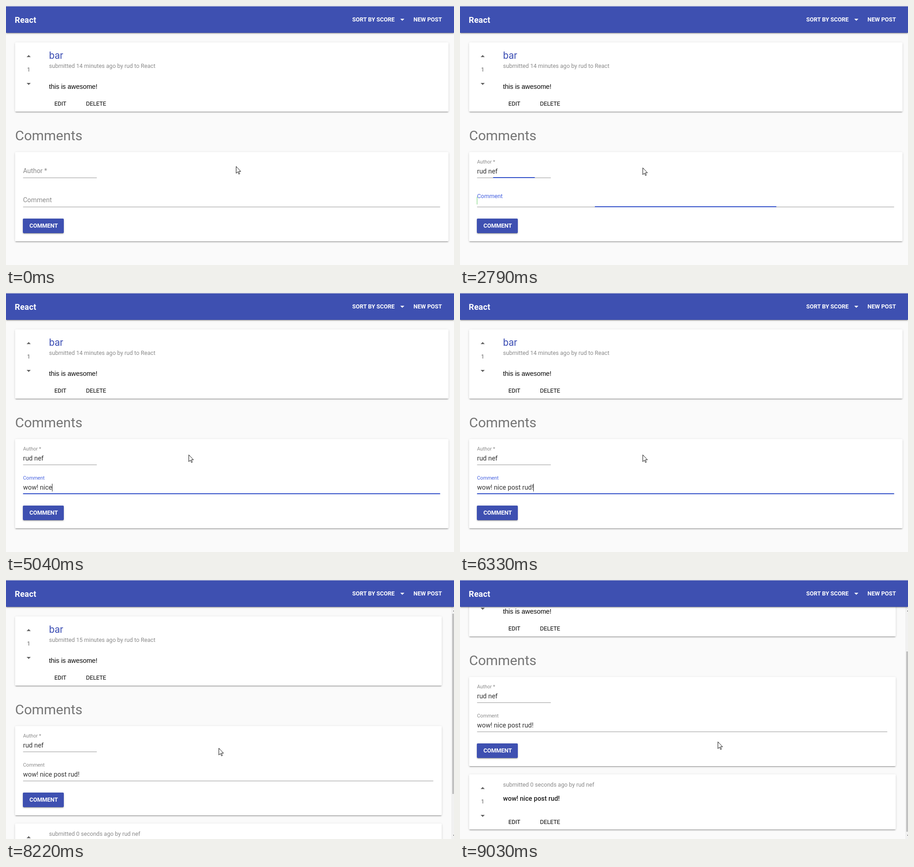
Recreate the animation shown at these times as an HTML page. Size 984x569 px, loop 10000 ms.

```html
<!DOCTYPE html>
<html lang="en">
<head>
<meta charset="utf-8">
<title>Comments</title>
<style>
  html, body { margin: 0; width: 100%; height: 100%; overflow: hidden; background: #fafafa; }
  body, svg { font-family: Roboto, sans-serif; }
  #stage { position: relative; width: 984px; height: 569px; overflow: hidden; }
  #stage div, svg { position: absolute; }
  svg { left: 0; top: 0; width: 984px; height: 569px; overflow: visible; white-space: pre; }
  .card { left: 20px; background: #fff; border-radius: 2px; }
  .card, #button, #header { box-shadow: 0 2px 2px rgba(0,0,0,.14), 0 3px 1px -2px rgba(0,0,0,.2), 0 1px 5px rgba(0,0,0,.12); }
  #button { left: 37px; top: 467px; width: 90px; height: 32px; border-radius: 2px; background: #3e50b1; }
  #header { left: 0; top: 0; width: 984px; height: 58px; border-top: 1px solid #d4d5dd; background: #3e50b1; }
  #bar { left: 978px; top: 59px; width: 15px; height: 510px; background: #f1f1f1; }
  #thumb { left: 2px; width: 12px; height: 396px; background: #c1c1c1; }
</style>
</head>
<body>
<div id="stage">
  <div id="page"><svg id="ink"></svg></div>
  <div id="bar"><div id="thumb"></div>
    <svg><path d="M4 10l3.5-4 3.5 4zM4 501l3.5 4 3.5-4z" fill="#505050"/></svg>
  </div>
  <div id="header"></div>
  <svg id="top"></svg>
</div>
<script>
const $ = id => document.getElementById(id);
const page = $('page'), ink = $('ink'), overlay = $('top');
const BLUE = '#304ec8', GREY = '#8a8a8a', LINE = '#979797';

function set(el, attrs) {
  for (const k in attrs) el.setAttribute(k, attrs[k]);
  return el;
}
function add(parent, tag, attrs) {
  const el = document.createElementNS('http://www.w3.org/2000/svg', tag);
  return parent.appendChild(set(el, attrs));
}
function text(parent, x, y, size, str, fill, more) {
  const el = add(parent, 'text', { x, y, 'font-size': size, fill, ...more });
  el.textContent = str;
  return el;
}
function box(top, height) {
  const el = document.createElement('div');
  el.className = 'card';
  el.style.cssText = `top:${top}px;height:${height}px`;
  page.insertBefore(el, ink);
  return el;
}
const medium = { 'font-weight': 500 };
const bold = { 'font-weight': 700 };

// Vote arrows, score and action buttons shared by post and reply
function votes(parent, y, actionsY) {
  add(parent, 'path', { d: `M45.3 ${y + 2.3}l4.5-4.5 4.5 4.5zM45.3 ${y + 59}l4.5 4.5 4.5-4.5z`, fill: '#616161' });
  text(parent, 49.8, y + 34.3, 12.6, '1', '#616161', { 'text-anchor': 'middle' });
  text(parent, 106.3, actionsY, 12.6, 'EDIT', '#000');
  text(parent, 175.8, actionsY, 12.6, 'DELETE', '#000');
}

const cards = [box(80, 152), box(321, 196), box(535, 121)];
const button = document.createElement('div');
button.id = 'button';
page.insertBefore(button, ink);

votes(ink, 110, 219.3);
text(ink, 94.5, 116, 21.6, 'bar', '#3f51b5');
const meta = text(ink, 94.5, 135.5, 12.6, '', GREY);
text(ink, 94.5, 182, 14.4, 'this is awesome!', '#000', { 'font-family': 'Liberation Sans, sans-serif' });
text(ink, 20, 295.3, 30.2, 'Comments', '#757575');
text(ink, 51.5, 487, 12.6, 'COMMENT', '#fff', bold);

const reply = add(ink, 'g', {});
votes(reply, 565, 644);
text(reply, 94.5, 562, 12.6, 'submitted 0 seconds ago by rud nef', GREY);
text(reply, 94.5, 593, 14.4, 'wow! nice post rud!', '#1c1c1c', medium);

function field(name, y) {
  const label = text(ink, 37.5, y, 14.4, name, GREY);
  const value = text(ink, 37.5, y + 1, 14.4, '', '#333');
  const line = add(ink, 'rect', { x: 37.5, y: y + 10, height: 1, fill: LINE });
  const focus = add(ink, 'rect', { y: y + 9, height: 2, fill: BLUE });
  return { y, label, value, line, focus };
}
const author = field('Author *', 367), comment = field('Comment', 431);
const caret = add(ink, 'rect', { width: 1, height: 17 });

text(overlay, 19.3, 37.3, 18, 'React', '#fff', { ...bold, 'letter-spacing': '.01em' });
text(overlay, 760.5, 34, 12.6, 'SORT BY SCORE', '#fff', bold);
text(overlay, 895, 34, 12.6, 'NEW POST', '#fff', bold);
add(overlay, 'path', { d: 'M866 28h9l-4.5 4.5z', fill: '#fff' });
const pointer = add(overlay, 'path', {
  d: 'M.5 .5v15l3.5-3.3 2.3 5.3 2.1-.9-2.3-5.2h4.6z', fill: '#fff', stroke: '#111'
});

const clamp = x => Math.max(0, Math.min(1, x));
const mix = (a, b, p) => a + (b - a) * p;
const smooth = x => x * x * (3 - 2 * x);

// cubic-bezier(.4, 0, .2, 1) over 200 ms
function ease(t, start) {
  const x = clamp((t - start) / 200);
  let lo = 0, hi = 1;
  for (let i = 0; i < 20; i++) {
    const s = (lo + hi) / 2, r = 1 - s;
    if (1.2 * r * r * s + .6 * r * s * s + s * s * s < x) lo = s; else hi = s;
  }
  return smooth(lo);
}

// Motion advances in discrete steps: [first, last, intervals]
const bursts = [[270, 1210, 14], [2790, 3000, 3], [6800, 7470, 9], [7740, 8220, 7], [8500, 9030, 7]];
function snap(t) {
  let at = 0;
  for (const [a, b, n] of bursts) {
    const d = (b - a) / n;
    if (t >= a) at = a + Math.min(n, Math.floor((t - a) / d + 1e-6)) * d;
  }
  return at;
}

const path = [
  [200, 505, 352], [690, 160, 357], [760, 160, 357], [1210, 401, 355], [6735, 401, 355],
  [7470, 68, 484], [7860, 68, 484], [8220, 467, 369], [8430, 467, 369], [8720, 566, 355]
];
function pointerAt(t) {
  if (t <= path[0][0]) return path[0].slice(1);
  for (let i = 1; i < path.length; i++) {
    const [t0, x0, y0] = path[i - 1], [t1, x1, y1] = path[i];
    if (t < t1) {
      const p = smooth((t - t0) / (t1 - t0));
      return [mix(x0, x1, p), mix(y0, y1, p)];
    }
  }
  return path[path.length - 1].slice(1);
}

const CLICK = 710, TAB = 2725, SUBMIT = 7675, REPLY = 7870;
const authorKeys = [1690, 1840, 1970, 2170, 2280, 2400, 2510];
const commentKeys = [3530, 3690, 3760, 4090, 4570, 4760, 4830, 4900, 5040, 5110, 5190, 5280,
  5370, 5570, 5720, 5850, 5980, 6120, 6330];
const typed = (str, keys, t) => str.slice(0, keys.filter(k => k <= t).length);

function drawField(f, s, start, end, width) {
  const up = ease(s, start), grow = up - ease(s, end);
  const active = s > start && s < end;
  set(f.label, { y: mix(f.y, f.y - 21.5, up), 'font-size': mix(14.4, 10.8, up), fill: active ? '#4460e0' : GREY });
  set(f.line, { width });
  set(f.focus, { x: 37.5 + width * (1 - grow) / 2, width: width * grow });
}

function drawCaret(f, keys, from, t, s, start, end) {
  const last = Math.max(from, ...keys.filter(k => k <= t));
  const on = s > start && s < end && (t < last || Math.floor((t - last) / 530) % 2 === 0);
  if (!on) return;
  const str = f.value.textContent;
  const x = Math.floor(37.5 + (str ? f.value.getComputedTextLength() : 0));
  set(caret, { x, y: f.y - 12, fill: f === comment && !str ? '#6cd06c' : '#222', opacity: 1 });
}

function draw(t) {
  const s = snap(t), sent = s >= REPLY;
  const shrink = sent ? 15 : 0;
  cards.forEach(c => c.style.width = 951.5 - shrink + 'px');
  cards[2].style.display = reply.style.display = $('bar').style.display = sent ? '' : 'none';
  meta.textContent = `submitted ${sent ? 15 : 14} minutes ago by rud to React`;

  author.value.textContent = typed('rud nef', authorKeys, t);
  comment.value.textContent = typed('wow! nice post rud!', commentKeys, t);
  drawField(author, s, CLICK, TAB, 162);
  drawField(comment, s, TAB, SUBMIT, 916 - shrink);
  set(caret, { opacity: 0 });
  drawCaret(author, authorKeys, 1210, t, s, CLICK, TAB);
  drawCaret(comment, commentKeys, 2740, t, s, TAB, SUBMIT);

  const left = 1 - clamp((s - 8702) / 328);
  const scroll = 108 * (1 - left * left);
  page.style.transform = `translateY(${-Math.round(scroll)}px)`;
  $('thumb').style.top = 15 + scroll * .77 + 'px';

  const [x, y] = pointerAt(s).map(Math.round);
  set(pointer, { transform: `translate(${x} ${y})` });
}

const began = performance.now();
function tick() {
  draw((performance.now() - began) % 10000);
  requestAnimationFrame(tick);
}
tick();
</script>
</body>
</html>
```
